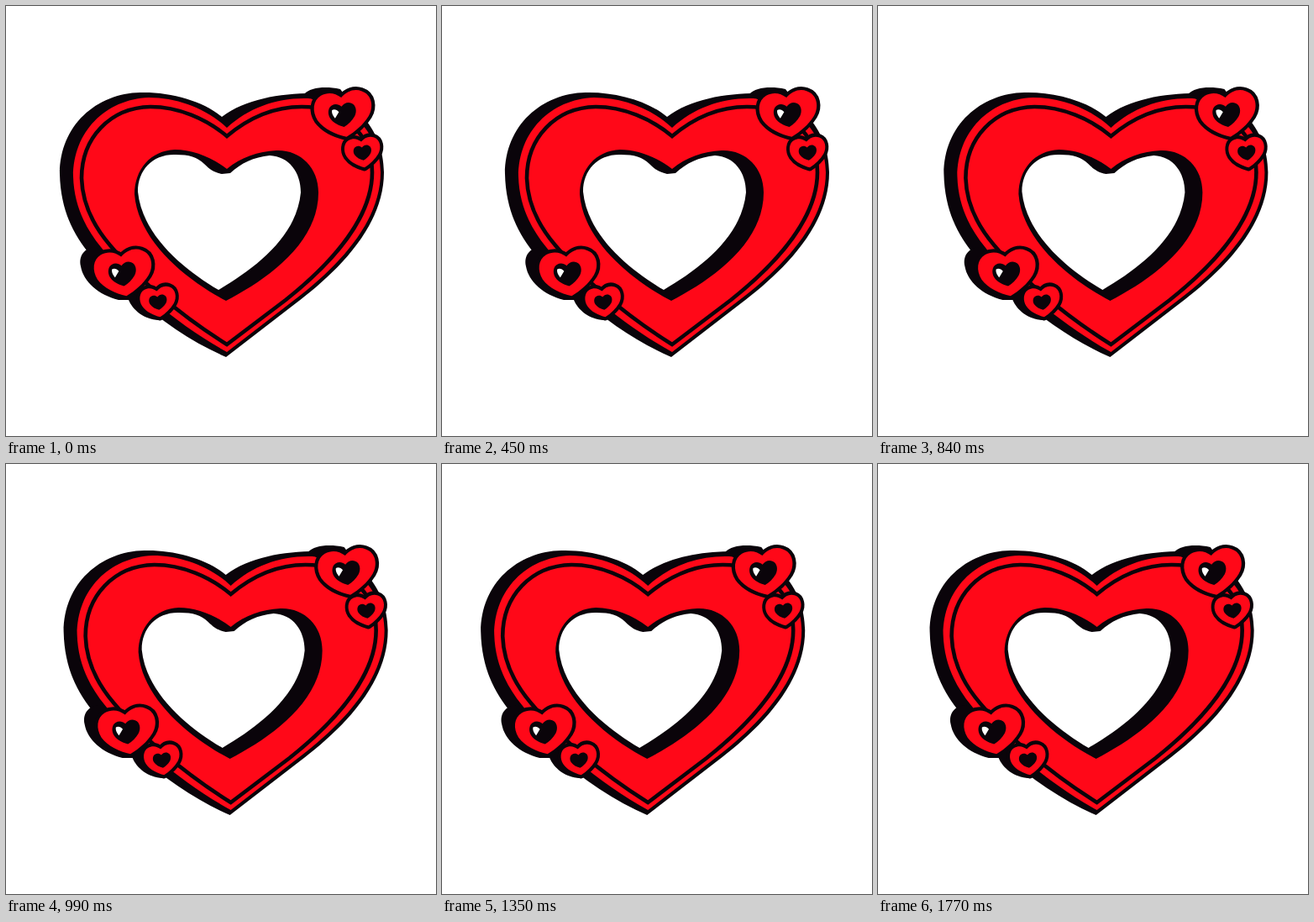
Animation of 512x512 px, one loop 1.8 s. Source, as an HTML page:

```html
<!DOCTYPE html>
<html lang="en">
<head>
<meta charset="utf-8">
<title>Swaying heart</title>
<style>
  html, body { margin: 0; width: 100%; height: 100%; overflow: hidden; background: #fff; }
  svg { display: block; width: 100vw; height: 100vh; }
  .red { fill: #ff0818; }
  .ink { fill: #0a040a; }
  .line { fill: none; stroke: #0a040a; stroke-width: 4.6; stroke-linejoin: miter; }
  .rim { stroke: #0a040a; stroke-linejoin: round; }
</style>
</head>
<body>
<svg viewBox="0 0 512 512">
  <defs>
    <path id="mini" d="M-1 -19 C6 -26 15 -29 24 -25 C36 -20 37 -5 30 5 C23 15 13 22 2 28 C-11 24 -24 17 -31 6 C-37 -5 -35 -18 -25 -23 C-16 -27 -8 -25 -1 -19Z"/>
    <g id="big">
      <use href="#mini" class="red rim" stroke-width="8.4" paint-order="stroke"/>
      <use href="#mini" class="ink" transform="translate(-1 1.5) scale(.48 .52)"/>
      <path d="M-13 -5 C-10 -6 -7 -5 -5 -2 L-10 5 C-12 2 -14 -1 -13 -5Z" fill="#fff"/>
    </g>
    <g id="small" transform="scale(.62 .66)">
      <use href="#mini" class="red rim" stroke-width="12.6" paint-order="stroke"/>
      <use href="#mini" class="ink" transform="translate(0 1) scale(.5)"/>
    </g>
  </defs>
  <g id="heart">
    <path class="ink" d="M257 132 C235 113 195 102 160 103 C108 104 64 142 64 200 C65 245 82 275 101 297 L150 344 C185 376 225 402 262 418 L345 354 C390 320 450 265 450 198 C450 145 410 104 365 104 C325 104 285 111 257 132Z"/>
    <path class="red" d="M263 145 C240 123 205 109 170 109 C118 111 80 150 80 203 C81 238 95 265 113 287 C146 330 205 380 263 412 L342 351 C387 317 446 262 446 198 C446 150 405 110 355 110 C320 110 288 122 263 145Z"/>
    <path class="line" d="M263 155 C238 134 205 120 172 120 C124 121 90 157 90 205 C91 238 106 264 124 285 C154 322 204 366 263 403 L333 350 C377 315 436 258 436 198 C436 152 400 120 352 120 C318 120 288 134 263 155Z"/>
    <path class="ink" d="M263 194 C245 180 222 171 201 171 C172 172 153 195 153 224 C157 279 214 326 262 351 C308 327 372 284 372 222 C372 192 350 171 322 172 C300 173 280 180 263 194Z"/>
    <path fill="#fff" d="M257 200 L267 199 C280 187 295 180 314 178 C337 179 351 198 351 222 C346 275 297 312 253 338 C212 314 162 273 157 221 C157 195 175 176 202 177 C218 177 228 180 236 188 C243 195 248 198 257 200Z"/>

    <path class="ink" d="M355 105 C362 97 380 95 398 99 L404 107 L376 118Z"/>
    <path class="ink" d="M108 287 C94 287 86 297 89 310 C92 328 110 344 134 350 L146 350 C151 362 164 373 182 374 L190 365 L150 320Z"/>
    <use href="#small" transform="translate(424.5 174) rotate(-4)"/>
    <use href="#big" transform="translate(401.5 128) rotate(-4)"/>
    <use href="#small" transform="translate(181 352) rotate(-4)"/>
    <use href="#big" transform="translate(139.5 317.5) rotate(-4)"/>
  </g>
</svg>
<script>
  const LOOP = 1800, REST = 300, STEP = 30, SWAY = 18.7;
  const heart = document.getElementById('heart');

  // Rest, then one full sine swing, advanced in fixed steps.
  function offset(ms) {
    const t = Math.floor((ms % LOOP) / STEP + 1e-6) * STEP;
    return t <= REST ? 0 : SWAY * Math.sin(2 * Math.PI * (t - REST) / (LOOP - REST));
  }

  let start;
  function draw(now) {
    start ??= now;
    heart.setAttribute('transform', `translate(${offset(now - start).toFixed(2)} 0)`);
    requestAnimationFrame(draw);
  }
  requestAnimationFrame(draw);
</script>
</body>
</html>
```
